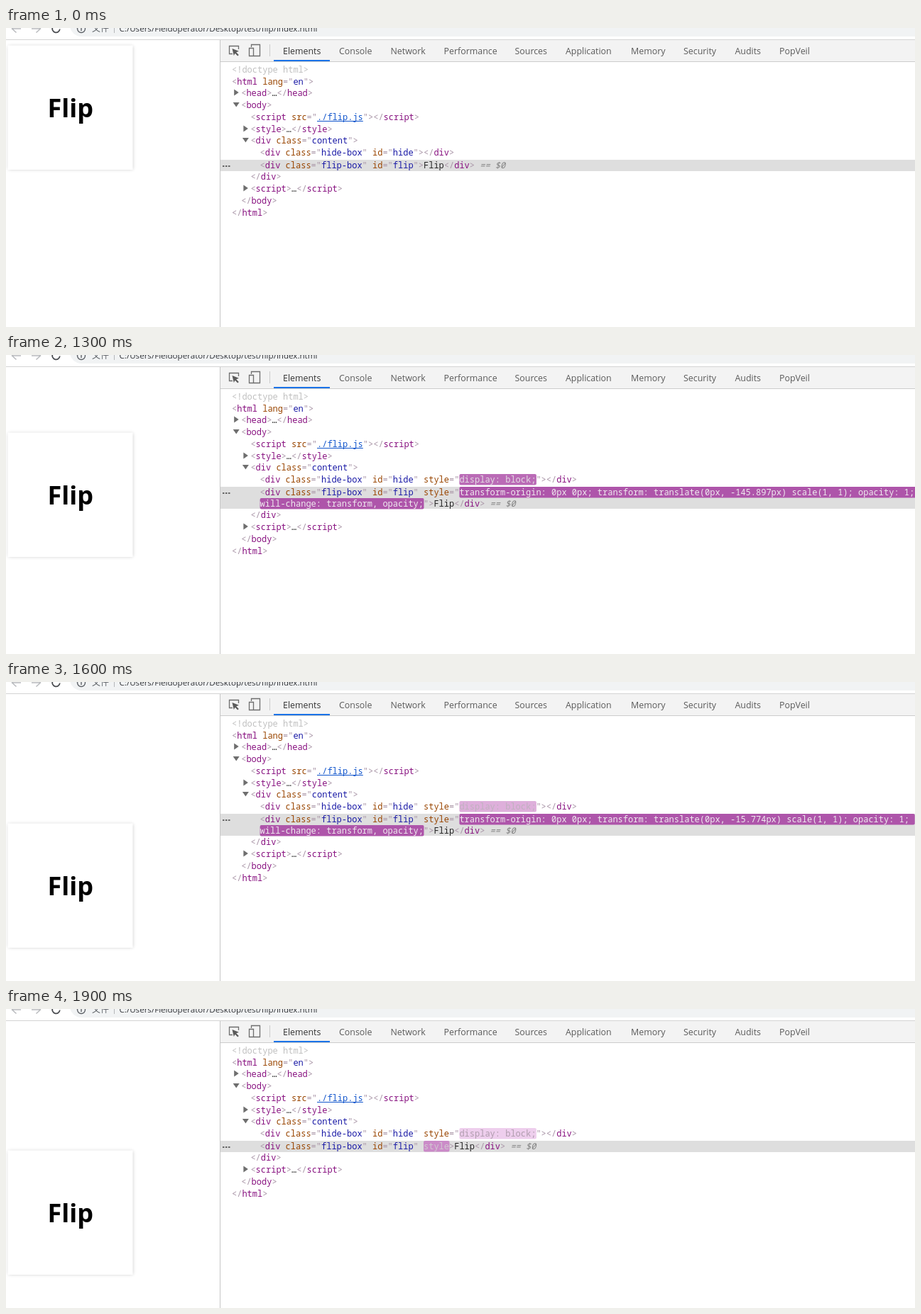
An HTML page with a canvas for the animation above (2 s loop, 1280 by 422 pixels).

```html
<!DOCTYPE html>
<html lang="en">
<head>
<meta charset="utf-8">
<style>
html, body { margin: 0; width: 100%; height: 100%; overflow: hidden; background: #fff; }
canvas { display: block; }
</style>
</head>
<body>
<canvas id="stage" width="1280" height="422"></canvas>
<script>
const ctx = document.getElementById('stage').getContext('2d');
const UI = '"Open Sans", "Noto Sans", sans-serif';
const MONO = '"Noto Sans Mono", "Liberation Mono", monospace';
const LOOP = 2000, STEP = 100, CHAR = 7.2;
const PUNCT = '#a894a6', TAG = '#881280', ATTR = '#994500', VALUE = '#1a1aa6', BODY = '#222';
const SHIFTS = ['189.34', '145.897', '102.454', '59.114', '15.774'];

function rect(x, y, w, h, color) {
  ctx.fillStyle = color;
  ctx.fillRect(x, y, w, h);
}

function round(x, y, w, h, r, color) {
  ctx.fillStyle = color;
  ctx.beginPath();
  ctx.roundRect(x, y, w, h, r);
  ctx.fill();
}

function text(str, x, y, font, color, align = 'left') {
  ctx.font = font;
  ctx.fillStyle = color;
  ctx.textAlign = align;
  ctx.fillText(str, x, y);
}

function stroke(path, color, width = 1.5) {
  ctx.strokeStyle = color;
  ctx.lineWidth = width;
  ctx.stroke(new Path2D(path));
}

function fill(path, color) {
  ctx.fillStyle = color;
  ctx.fill(new Path2D(path));
}

// cubic-bezier(0, 0, .2, 1)
function ease(x) {
  let lo = 0, hi = 1;
  for (let i = 0; i < 24; i++) {
    const m = (lo + hi) / 2;
    if (0.6 * m * m + 0.4 * m ** 3 < x) lo = m; else hi = m;
  }
  return 3 * lo * lo - 2 * lo ** 3;
}

function mix(a, b, k) {
  return `rgb(${a.map((v, i) => Math.round(v + (b[i] - v) * k))})`;
}

// Colours of a changed attribute that fades out with age in ms
function flash(age) {
  const k = ease(Math.min(1, age / 1120));
  return {
    color: mix([255, 255, 255], [168, 148, 166], k),
    bg: mix([158, 54, 153], [245, 219, 244], k)
  };
}

const run = (str, color, opt = {}) => ({ str, color, ...opt });

function attr(name, value, opt = {}) {
  return [run(' ', PUNCT), run(name, ATTR), run('="', PUNCT), run(value, VALUE, opt), run('"', PUNCT)];
}

const open = (name, ...attrs) => [run('<', PUNCT), run(name, TAG), ...attrs.flat(), run('>', PUNCT)];
const close = name => [run('</', PUNCT), run(name, TAG), run('>', PUNCT)];
const folded = name => [...open(name), run('…', BODY), ...close(name)];

function drawRow(runs, depth, y) {
  let x = 318 + 13.2 * depth;
  for (const { str, color, bg, link, italic } of runs) {
    const w = str.length * CHAR;
    if (bg) round(x, y - 8, w + 0.5, 15.5, 2, bg);
    text(str, x, y + 4, `${italic ? 'italic ' : ''}12px ${MONO}`, color);
    if (link) rect(x, y + 5, w, 1, color);
    x += w;
  }
}

function arrow(depth, y, down) {
  const x = 311 + 13.2 * depth;
  fill(down ? `M${x - 4.5} ${y - 4}h9l-4.5 6.5z` : `M${x - 3} ${y - 5.5}v9l6.5 -4.5z`, '#6e6e6e');
}

function drawBrowser() {
  rect(0, 16, 1280, 1, '#d4d4d4');
  round(90, -20, 1220, 32, 16, '#f1f3f4');
  stroke('M21 1H9M14.5 -5L8.5 1l6 5.5', '#b9bbbe');
  stroke('M36 1H48M42.5 -5l6 6l-6 5.5', '#b9bbbe');
  stroke('M75.8 1.5A5.3 5.3 0 1 1 74 -3', '#4a4d51', 1.8);
  stroke('M111.5 1a5.5 5.5 0 1 1 -11 0a5.5 5.5 0 1 1 11 0M106 0v4', '#5f6368', 1.4);
  text('文件', 121, 5, '12px "Noto Sans CJK SC", "Noto Sans CJK", sans-serif', '#5f6368');
  rect(152, 0, 1, 7, '#b4b6b9');
  text('C:/Users/Fieldoperator/Desktop/test/flip/index.html', 159.5, 5, `11.6px ${UI}`, '#303236');
}

function drawTabs() {
  rect(302, 17, 978, 30, '#f3f3f3');
  rect(302, 47, 978, 1, '#ccc');
  rect(301, 17, 1, 405, '#c6c6c6');
  stroke('M319 36.5H314.5V25.5H327.5V30', '#6e6e6e', 1.3);
  fill('M318.5 29l9.5 3.8l-3.8 1.4l3.6 3.7l-1.6 1.5l-3.6 -3.7l-1.8 3.2z', '#5a5a5a');
  stroke('M345.5 27V23.5H357.5V39.5H349', '#6e6e6e', 1.3);
  stroke('M342.5 28.5H348.5V39.5H342.5z', '#6e6e6e', 1.3);
  rect(371, 23, 1, 17, '#ccc');
  const tabs = [['Elements', 390], ['Console', 469], ['Network', 541.5], ['Performance', 616.5],
    ['Sources', 716.5], ['Application', 788], ['Memory', 880], ['Security', 954],
    ['Audits', 1026.5], ['PopVeil', 1089]];
  tabs.forEach(([name, x], i) => text(name, x, 37, `12.4px ${UI}`, i ? '#5a5a5a' : '#333'));
  rect(377, 45, 79, 2, '#1a73e8');
}

function drawTree(t) {
  const moving = t >= 1200 && t < 1700, done = t >= 1700;
  const hide = [attr('class', 'hide-box'), attr('id', 'hide')];
  const flip = [attr('class', 'flip-box'), attr('id', 'flip')];
  const tail = [run('Flip', BODY), ...close('div'), run(' == $0', '#7f7f7f', { italic: true })];
  if (t >= 1200) hide.push(attr('style', 'display: block;', flash(t - 1180)));

  let line = open('div', ...flip), wrapped;
  if (moving) {
    const hot = flash(Math.min(60, t - 1190));
    const shift = SHIFTS[(t - 1200) / STEP];
    const value = `transform-origin: 0px 0px; transform: translate(0px, -${shift}px) scale(1, 1); opacity: 1; `;
    line = open('div', ...flip, attr('style', value, hot)).slice(0, -2);
    wrapped = [run('will-change: transform, opacity;', '#fff', hot), run('">', PUNCT), ...tail];
  } else {
    if (done) line.splice(-1, 0, run(' ', PUNCT), run('style', ATTR, flash(t - 1665)));
    line.push(...tail);
  }

  const rows = [
    [0, [run('<!doctype html>', '#c0c0c0')]],
    [0, open('html', attr('lang', 'en'))],
    [1, folded('head'), 'right'],
    [1, open('body'), 'down'],
    [2, [...open('script', attr('src', './flip.js', { link: true, color: '#1155cc' })), ...close('script')]],
    [2, folded('style'), 'right'],
    [2, open('div', attr('class', 'content')), 'down'],
    [3, [...open('div', ...hide), ...close('div')]],
    [3, line],
    [2, close('div')],
    [2, folded('script'), 'right'],
    [1, close('body')],
    [0, close('html')]
  ];
  rect(302, 186, 978, moving ? 31 : 16, '#dedede');
  for (const x of [305, 309, 313]) rect(x, 194, 2.5, 2, '#666');
  rows.forEach(([depth, runs, mark], i) => {
    // the selected row is a little taller than the rest
    const y = Math.round(58.8 + 16.75 * i + (i > 7 ? 0.8 : 0)) + (moving && i > 8 ? 16 : 0);
    if (mark) arrow(depth, y, mark === 'down');
    drawRow(runs, depth, y);
  });
  if (wrapped) drawRow(wrapped, 3, 210);
}

function drawBox(t) {
  const y = t < 1100 ? 0 : Math.round(Math.min(175, 4 + 0.407 * (t - 1100)));
  ctx.save();
  ctx.shadowColor = 'rgba(0, 0, 0, .22)';
  ctx.shadowBlur = 5;
  rect(2.5, 24.5 + y, 176, 175.5, '#fff');
  ctx.restore();
  text('Flip', 90.8, 126 + y, `bold 36px ${UI}`, '#000', 'center');
}

function draw() {
  const t = Math.floor(performance.now() % LOOP / STEP) * STEP;
  rect(0, 0, 1280, 422, '#fff');
  drawBox(t);
  drawBrowser();
  drawTabs();
  drawTree(t);
  requestAnimationFrame(draw);
}
draw();
</script>
</body>
</html>
```
